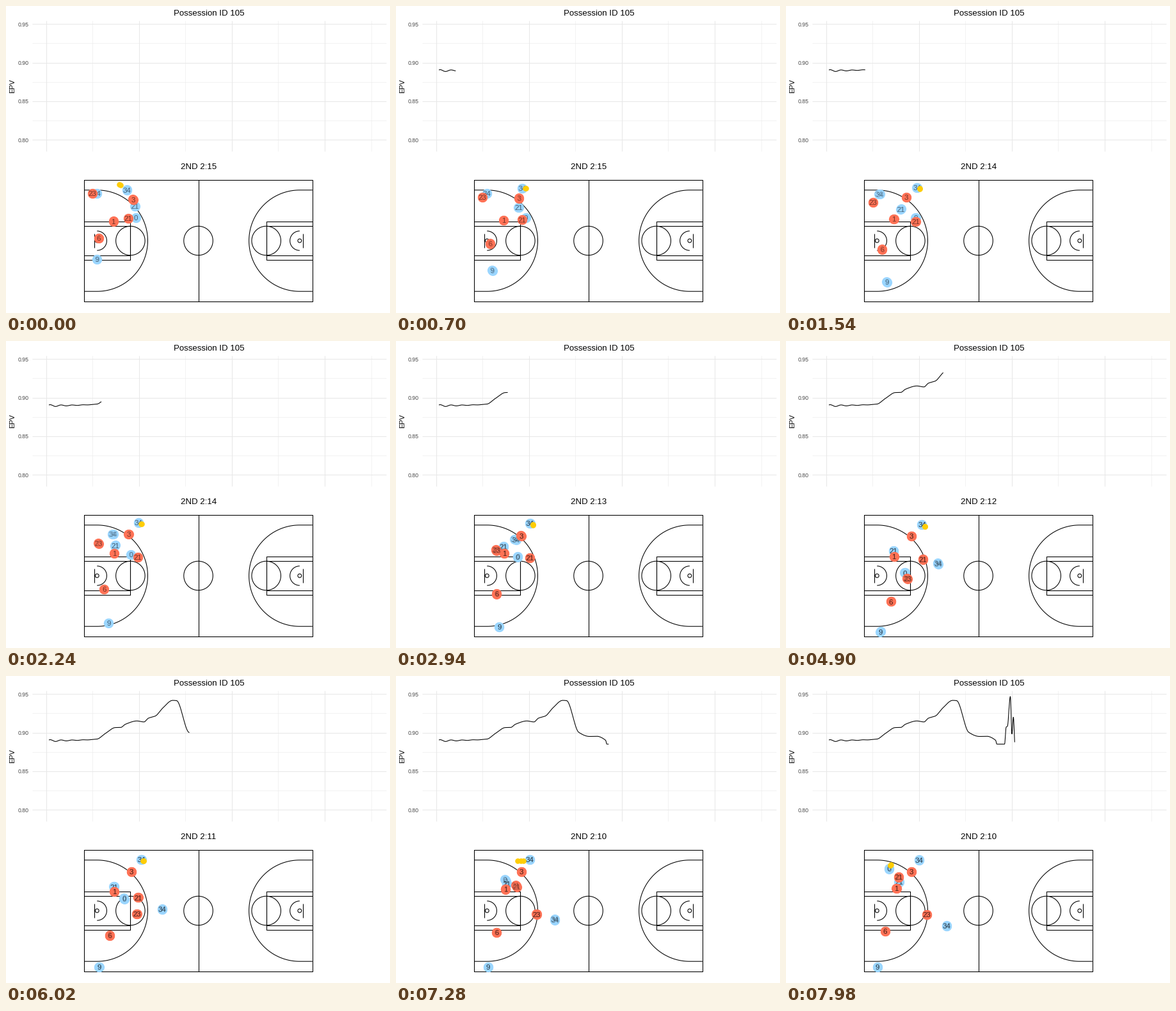
Write a matplotlib script that moves like this. It is 600 px wide and 480 px high and loops after 8 s.

```python
import numpy as np
import matplotlib.pyplot as plt
from matplotlib.animation import FuncAnimation
from matplotlib.collections import LineCollection

W, H, DPI = 600, 480, 100
PX = 72 / DPI                      # points per pixel
TICK, STEP, LOOP = 20, 140, 8000   # ms
BLUE, RED, GOLD = "#9bd6ff", "#ff7256", "#ffcd05"

plt.rcParams["font.family"] = "Liberation Sans"
fig = plt.figure(figsize=(W / DPI, H / DPI), dpi=DPI, facecolor="white")
ax = fig.add_axes([0, 0, 1, 1])
ax.set(xlim=(0.5, W + 0.5), ylim=(H + 0.5, 0.5))
ax.axis("off")


def smooth(points, q):
    """Monotone cubic through rows of (t, values...), held still outside."""
    p = np.asarray(points, float)
    t, v = p[:, 0], p[:, 1:]
    q = np.clip(q, t[0], t[-1])
    h = np.diff(t)[:, None]
    d = np.diff(v, axis=0) / h
    a, b = d[:-1], d[1:]
    same = a * b > 0
    mid = np.where(same, 2 * a * b / np.where(same, a + b, 1), 0)
    m = np.vstack([d[:1], mid, d[-1:]])
    i = np.clip(np.searchsorted(t, q, side="right") - 1, 0, len(h) - 1)
    u = (q - t[i])[:, None] / h[i]
    return (v[i] * (1 + 2 * u) * (1 - u) ** 2 + v[i + 1] * u * u * (3 - 2 * u)
            + h[i] * u * (1 - u) * (m[i] * (1 - u) - m[i + 1] * u))


def label(x, y, s, size, **kw):
    """Text whose capitals are centred on y."""
    kw = {"ha": "center", "va": "baseline", "color": "black", **kw}
    return ax.text(x, y + 0.358 * size, s, fontsize=size * PX, **kw)


def lines(paths, color, width, z):
    ax.add_collection(LineCollection(paths, colors=color,
                                     linewidths=width * PX, zorder=z))


def arc(cx, cy, r, a0, a1):
    a = np.radians(np.linspace(a0, a1, 90))
    return np.column_stack([cx + r * np.cos(a), cy + r * np.sin(a)])


# --- value chart -----------------------------------------------------------
def hline(y):
    return [(41, y), (594, y)]


def vline(x):
    return [(x, 23), (x, 227)]


rows = [28.7 + 60.35 * i for i in range(4)]
cols = [63.1 + 145.1 * i for i in range(4)]
lines([hline(y + 30.2) for y in rows[:3]] + [vline(x + 72.6) for x in cols],
      "#ebebeb", 0.6, 0)
lines([hline(y) for y in rows] + [vline(x) for x in cols], "#e8e8e8", 1.07, 1)
for i, y in enumerate(rows):
    label(36.3, y + 0.3, f"{0.95 - 0.05 * i:.2f}", 8.8, ha="right", color="#4d4d4d")
label(317.5, 11, "Possession ID 105", 13.2)
ax.text(14, 125, "EPV", fontsize=11 * PX, rotation=90,
        rotation_mode="anchor", ha="center", va="baseline")

TREND = [(68, 101.8), (112, 100.8), (142, 99.2), (155, 91), (171, 81.2),
         (180, 80.8), (187, 76), (205, 70.8), (216, 72.3), (223, 66.5),
         (234, 63), (245, 51), (261, 38.6), (267, 39), (286, 88.5),
         (303, 95), (314, 94.7), (328, 101), (330, 107), (342, 107),
         (344.5, 80.5), (346.5, 79), (351, 32.5), (353.5, 91), (355.8, 65),
         (358, 109)]
curve_x = np.arange(68, 358.1, 0.25)
curve_y = (smooth(TREND, curve_x)[:, 0]
           + 1.8 * np.sin(2 * np.pi * (curve_x - 74) / 17) * np.exp((68 - curve_x) / 30))
curve, = ax.plot([], [], color="black", lw=1.07 * PX, zorder=2)

# --- court -----------------------------------------------------------------
L, R, T, B = 122.85, 479.25, 272.7, 462.3
CX, CY, FT = (L + R) / 2, (T + B) / 2, 3.792
hoop, paint = L + 5.25 * FT, L + 19 * FT


def key(dy):
    return [(L, CY - dy), (paint, CY - dy), (paint, CY + dy), (L, CY + dy)]


three = np.vstack([[(L, CY - 79.2)], arc(hoop, CY, 79.2, -90, 90), [(L, CY + 79.2)]])
half = [three, key(8 * FT), key(6 * FT), arc(paint, CY, 6 * FT, 0, 360),
        arc(hoop, CY, 4 * FT, -90, 90), arc(hoop, CY, 2.9, 0, 360),
        [(L + 4 * FT, CY - 3 * FT), (L + 4 * FT, CY + 3 * FT)]]
half = [np.array(p, float) for p in half]
other = [np.column_stack([L + R - p[:, 0], p[:, 1]]) for p in half]
frame = [(L, T), (R, T), (R, B), (L, B), (L, T)]
lines(half + other + [frame, [(CX, T), (CX, B)], arc(CX, CY, 6 * FT, 0, 360)],
      "black", 1.07, 2)
clock = label(301.5, 251, "", 13.2)

# --- players and ball: routes of (step, x, y) -------------------------------
BLUE_TEAM = [
    ("34", [(0, 189, 288), (11, 205, 284), (35, 213, 287.5), (57, 208, 288)]),
    ("34", [(10, 142, 293), (21, 187, 311), (35, 238, 348.5), (57, 251.5, 391)]),
    ("21", [(0, 202, 313.5), (21, 168, 322), (43, 169, 330), (57, 177, 322)]),
    ("0", [(11, 203, 331.5), (21, 190.5, 338), (35, 186, 363), (43, 185, 349),
           (57, 161, 301)]),
    ("9", [(0, 142.5, 396), (11, 158, 432), (21, 162, 447.5), (35, 148, 455),
           (57, 143.5, 455.5)]),
]
RED_TEAM = [
    ("23", [(0, 135, 293), (11, 136.5, 307.5), (21, 157, 327.5), (35, 190, 372),
            (52, 220.5, 373)]),
    ("3", [(0, 199, 303), (11, 188, 299.5), (21, 196, 305), (57, 196.5, 306.5)]),
    ("21", [(0, 191.5, 332), (11, 203, 337.5), (35, 214.5, 342), (43, 207, 347),
            (57, 176, 314.5)]),
    ("1", [(0, 168, 337), (21, 169.5, 332), (38, 169, 338), (57, 173, 332)]),
    ("6", [(0, 145, 363), (11, 150.5, 381), (35, 164.5, 408), (57, 155, 399)]),
]
BALL = [(0, 177, 279.5), (2, 196, 285.5), (11, 209.3, 286), (35, 217.5, 290.5),
        (49.9, 210, 289), (54.5, 171, 291), (57, 163.7, 296.5)]


def dots(color, radius, z):
    return ax.scatter([], [], s=(2 * radius * PX) ** 2, color=color,
                      linewidths=0, zorder=z)


class Team:
    def __init__(self, roster, color, z):
        self.routes = [route for _, route in roster]
        self.dots = dots(color, 7.6, z)
        self.tags = [[label(0, 0, name, 11.4, alpha=0.32, zorder=z + 1)
                      for _ in range(3)] for name, _ in roster]

    def place(self, times):
        spots = [smooth(route, times) for route in self.routes]
        for pts, tags in zip(spots, self.tags):
            for i, tag in enumerate(tags):
                tag.set_visible(i < len(pts))
                if i < len(pts):
                    tag.set_position((pts[i, 0], pts[i, 1] + 0.358 * 11.4))
        self.dots.set_offsets(np.vstack(spots))


teams = [Team(BLUE_TEAM, BLUE, 3), Team(RED_TEAM, RED, 5)]
ball = dots(GOLD, 4.3, 7)
samples = 0.29 + 0.424 * np.arange(140)   # tracking samples, in steps


def draw(i):
    k = i * TICK // STEP
    drawn = curve_x <= 67.8 + 5.09 * k
    curve.set_data(curve_x[drawn], curve_y[drawn])
    clock.set_text(f"2ND 2:{15 - int((k + 4) / 10.75)}")
    now = samples[np.floor(samples) == k] - 0.5
    for team in teams:
        team.place(now)
    ball.set_offsets(smooth(BALL, now))
    return []


anim = FuncAnimation(fig, draw, frames=LOOP // TICK, interval=TICK,
                     repeat=True, repeat_delay=0, blit=False)
plt.show()
```
